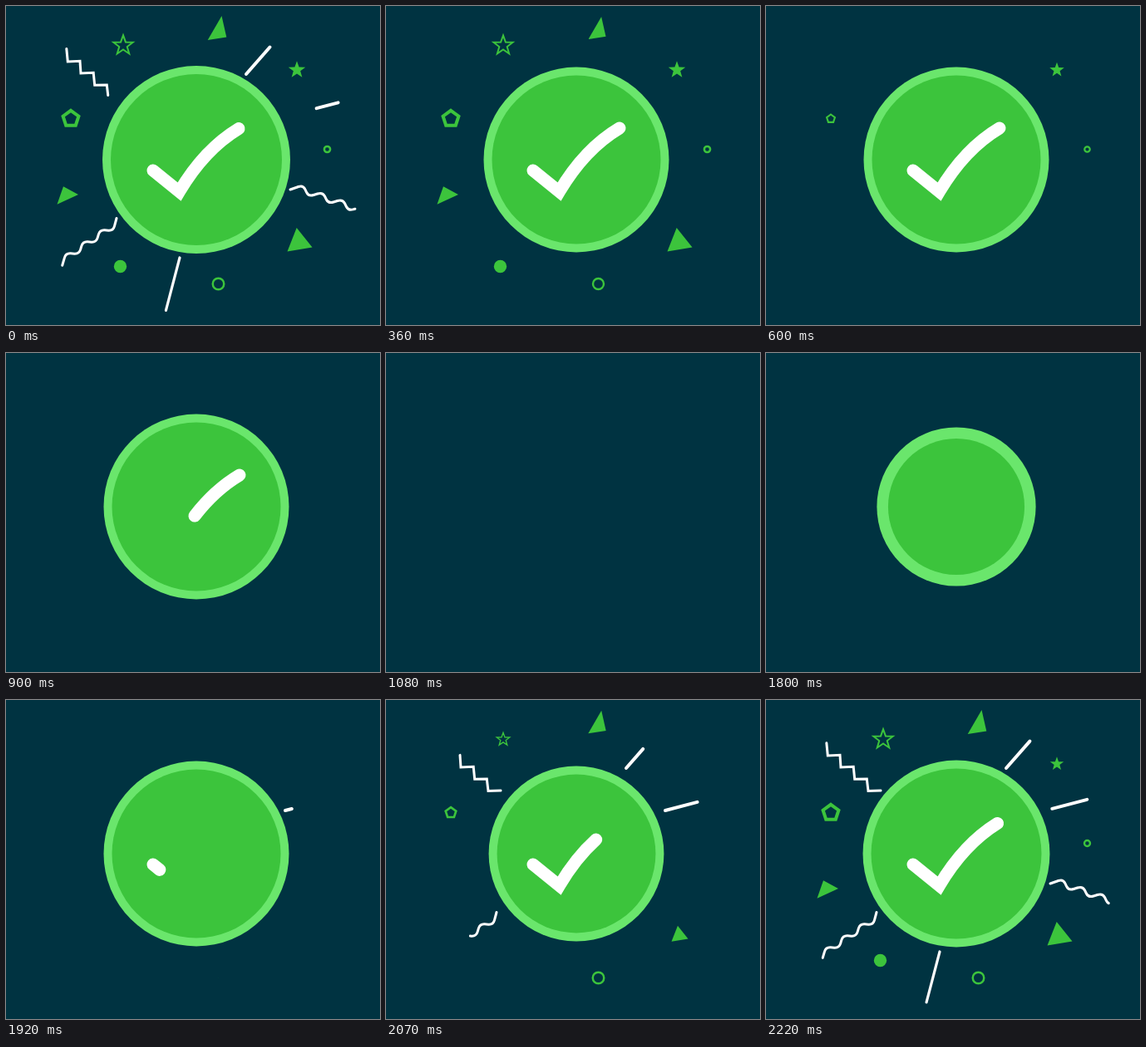
These frames come from a looping animation (450x384 px, 2250 ms). An HTML page:

```html
<!DOCTYPE html>
<html lang="en">
<head>
<meta charset="utf-8">
<title>Success burst</title>
<style>
  html, body { margin: 0; width: 100%; height: 100%; overflow: hidden; background: #003341; }
  svg { display: block; width: 100%; height: 100%; }
</style>
</head>
<body>
<svg id="stage" viewBox="0 0 450 384">
  <g id="streaks" fill="none" stroke="#fff" stroke-linecap="round"></g>
  <g id="confetti"></g>
  <circle id="rim" cx="229" cy="185" fill="#6ae66c"/>
  <circle id="disc" cx="229" cy="185" fill="#3cc43c"/>
  <path id="check" d="M177 198L208.5 223.5Q239 172 281 147" pathLength="1"
        fill="none" stroke="#fff" stroke-width="15" stroke-linecap="round"/>
</svg>
<script>
const LOOP = 2250, STEP = 30, LEAD = 600; // the burst is already open when the page loads
const GREEN = '#3cc43c';
const $ = id => document.getElementById(id);

const span = (t, start, length) => Math.min(1, Math.max(0, (t - start) / length));
const smooth = p => p * p * (3 - 2 * p);
const easeOut = (p, power = 3) => 1 - (1 - p) ** power;
const mix = (a, b, p) => a + (b - a) * p;

function add(parent, tag, attrs) {
  const node = document.createElementNS('http://www.w3.org/2000/svg', tag);
  for (const key in attrs) node.setAttribute(key, attrs[key]);
  return parent.appendChild(node);
}

// Shows the part of a path between two fractions of its length.
function trim(path, from, to) {
  const visible = to - from;
  path.style.display = visible > 0.004 ? '' : 'none';
  path.setAttribute('stroke-dasharray', `${Math.max(visible, 0)} 9`);
  path.setAttribute('stroke-dashoffset', -from);
}

const polyline = points => 'M' + points.map(p => p.join(' ')).join('L');

function wave(points) {
  const toward = (a, b) => [mix(a[0], b[0], 0.36), mix(a[1], b[1], 0.36)].join(' ');
  let d = 'M' + points[0].join(' ');
  for (let i = 1; i < points.length - 1; i++) {
    const corner = points[i];
    d += `L${toward(corner, points[i - 1])}Q${corner.join(' ')} ${toward(corner, points[i + 1])}`;
  }
  return d + 'L' + points.at(-1).join(' ');
}

function regular(corners, radius, innerRadius) {
  const count = innerRadius ? corners * 2 : corners;
  return polyline(Array.from({ length: count }, (_, i) => {
    const r = innerRadius && i % 2 ? innerRadius : radius;
    const angle = i * 2 * Math.PI / count;
    return [r * Math.sin(angle), -r * Math.cos(angle)];
  })) + 'Z';
}

// draw: start, duration, easing power; erase: start
const streaks = [
  { width: 3, draw: [310, 300, 3], erase: 590,
    d: polyline([[138, 109], [123, 109.5], [121.3, 95], [106.7, 95.3], [105.2, 80.3],
                 [90, 81], [89, 66.3], [74.3, 67], [72.8, 51.5]]) },
  { width: 4, draw: [340, 300, 4], erase: 600, d: 'M289 82L317.5 49.5' },
  { width: 4, draw: [250, 300, 3], erase: 570, d: 'M336 133L378 122', drift: 32 },
  { width: 3, draw: [360, 300, 3], erase: 630,
    d: wave([[133, 255.5], [129, 270.5], [113, 269.5], [108.5, 284.5], [92.5, 283.5],
             [88, 298.5], [72, 297.5], [67.5, 313]]) },
  { width: 3.2, draw: [420, 300, 4], erase: 680, d: 'M209 303L192 368' },
  { width: 3, draw: [425, 260, 2.3], erase: 690,
    d: wave([[342, 221], [357.5, 215.5], [364, 229.5], [381, 224], [388, 238],
             [405, 232.5], [412, 246.5], [427.5, 242]]) }
];
for (const s of streaks) {
  s.node = add($('streaks'), 'path', { d: s.d, pathLength: 1, 'stroke-width': s.width });
}

const confetti = [];
function piece(x, y, grow, shrink, tag, attrs, stroke) {
  const paint = stroke
    ? { fill: 'none', stroke: GREEN, 'stroke-width': stroke, 'stroke-miterlimit': 10 }
    : { fill: GREEN };
  confetti.push({ x, y, grow, shrink, node: add($('confetti'), tag, { ...attrs, ...paint }) });
}
piece(254, 26.5, 278, 930, 'path', { d: 'M5.5 -14.5L11.3 11L-11.3 14.5Z' });
piece(255.5, 334.5, 265, 940, 'circle', { r: 6.75 }, 2.5);
piece(141, 47.5, 320, 950, 'path', { d: regular(5, 12.3, 5) }, 2);
piece(353.5, 281.5, 320, 1000, 'path', { d: 'M-3.8 -14.5L15 9L-15 14Z' });
piece(74.2, 228, 420, 1010, 'path', { d: 'M-5.2 -10.7L12.8 -1L-12.7 10.7Z' });
piece(137.5, 313.5, 420, 1020, 'circle', { r: 7.7 });
piece(78, 135.7, 320, 1090, 'path', { d: regular(5, 9.9) }, 4);
piece(350, 77, 450, 1150, 'path', { d: regular(5, 10.8, 4.4) });
piece(386.5, 172.5, 425, 1160, 'circle', { r: 3.6 }, 2.5);

function discRadius(t) {
  const REST = 111.5, DIP = 105.4, PEAK = 113;
  if (t < 270) return REST * easeOut(span(t, 10, 260), 2.52);
  if (t < 415) return mix(REST, DIP, smooth(span(t, 270, 145)));
  if (t < 600) return mix(DIP, PEAK, smooth(span(t, 415, 185)));
  if (t < 1530) return mix(PEAK, REST, smooth(span(t, 600, 160)));
  return REST * (1 - span(t, 1530, 150) ** 3);
}

function render(t) {
  $('rim').setAttribute('r', discRadius(t));
  const lag = t < 270 ? 10 : 0;
  $('disc').setAttribute('r', Math.max(0, discRadius(t - lag) - 10));

  trim($('check'), smooth(span(t, 1380, 240)), easeOut(span(t, 260, 424)));

  for (const { node, draw: [start, length, power], erase, drift } of streaks) {
    trim(node, easeOut(span(t, erase, 265), 4), easeOut(span(t, start, length), power));
    if (drift) {
      const shift = drift * smooth(span(t, 535, 105));
      node.setAttribute('transform', `translate(${shift} ${-0.262 * shift})`);
    }
  }

  for (const { node, x, y, grow, shrink } of confetti) {
    const scale = span(t, grow, 150) * (1 - span(t, shrink, 180) ** 1.5);
    node.setAttribute('transform', `translate(${x} ${y}) scale(${scale})`);
  }
}

const begin = performance.now();
function tick() {
  const elapsed = performance.now() - begin;
  render((Math.floor(elapsed / STEP) * STEP + LEAD) % LOOP);
  requestAnimationFrame(tick);
}
tick();
</script>
</body>
</html>
```
